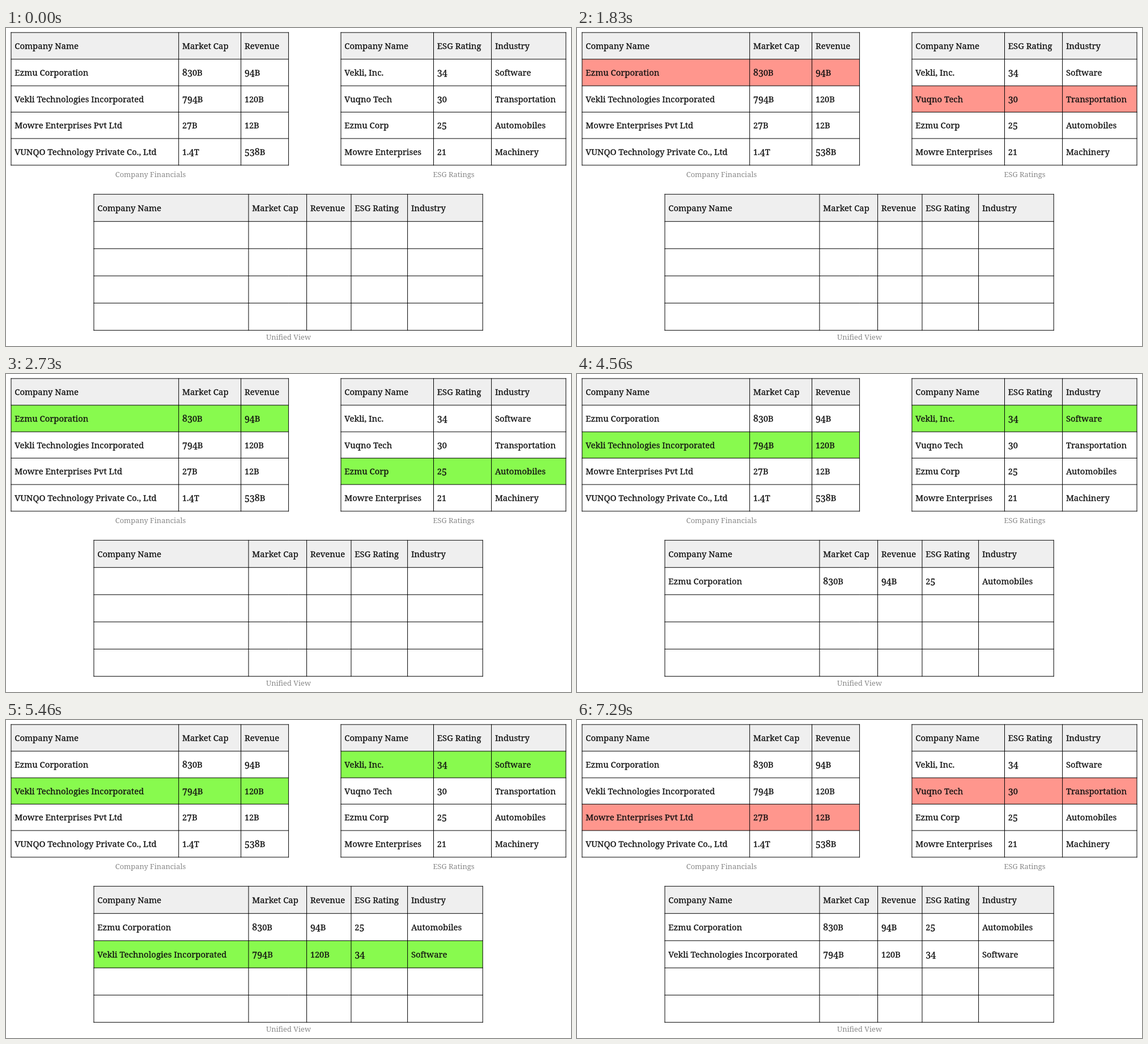
Write an HTML page with a canvas that moves like this. It is 997 px wide and 561 px high and loops after 8 s.

```html
<!DOCTYPE html>
<html lang="en">
<head>
<meta charset="utf-8">
<title>Entity matching</title>
<style>
html, body { margin: 0; width: 100%; height: 100%; overflow: hidden; background: #fff; }
canvas { display: block; }
</style>
</head>
<body>
<canvas id="stage" width="997" height="561"></canvas>
<script>
const ctx = document.getElementById("stage").getContext("2d");
const LOOP = 8000;
const RED = "#ff968d", GREEN = "#88fa4e", HEAD = "#efefef";
const TEXT = 14.9, TALL_FIGURE = 16, SHORT_FIGURE = 14.5, CAPTION = 12.9;
const font = size => `${size}px "Noto Serif", serif`;

const financials = {
  xs: [9, 304.7, 414.6, 498.6],
  ys: [8, 55, 102, 148.4, 195, 242],
  caption: ["Company Financials", 255, 263],
  rows: [
    ["Company Name", "Market Cap", "Revenue"],
    ["Ezmu Corporation", "830B", "94B"],
    ["Vekli Technologies Incorporated", "794B", "120B"],
    ["Mowre Enterprises Pvt Ltd", "27B", "12B"],
    ["VUNQO Technology Private Co., Ltd", "1.4T", "538B"]
  ]
};
const ratings = {
  xs: [591, 754.5, 856.6, 988],
  ys: financials.ys,
  caption: ["ESG Ratings", 790, 263],
  rows: [
    ["Company Name", "ESG Rating", "Industry"],
    ["Vekli, Inc.", "34", "Software"],
    ["Vuqno Tech", "30", "Transportation"],
    ["Ezmu Corp", "25", "Automobiles"],
    ["Mowre Enterprises", "21", "Machinery"]
  ]
};
const unified = {
  xs: [155, 428, 530.6, 609, 708.6, 841.2],
  ys: [0, 1, 2, 3, 4, 5].map(row => 293.3 + 48 * row),
  caption: ["Unified View", 498.5, 550],
  rows: [
    ["Company Name", "Market Cap", "Revenue", "ESG Rating", "Industry"],
    [...financials.rows[1], ...ratings.rows[3].slice(1)],
    [...financials.rows[2], ...ratings.rows[1].slice(1)]
  ]
};

// Compared rows, their colour, merged rows so far, highlighted merged row.
const steps = [
  { at: 0, left: 0, right: 0, color: null, merged: 0, fresh: 0 },
  { at: 930, left: 1, right: 1, color: RED, merged: 0, fresh: 0 },
  { at: 1830, left: 1, right: 2, color: RED, merged: 0, fresh: 0 },
  { at: 2730, left: 1, right: 3, color: GREEN, merged: 0, fresh: 0 },
  { at: 3660, left: 1, right: 3, color: GREEN, merged: 1, fresh: 1 },
  { at: 4560, left: 2, right: 1, color: GREEN, merged: 1, fresh: 0 },
  { at: 5460, left: 2, right: 1, color: GREEN, merged: 2, fresh: 2 },
  { at: 6360, left: 3, right: 1, color: RED, merged: 2, fresh: 0 },
  { at: 7290, left: 3, right: 2, color: RED, merged: 2, fresh: 0 }
];

function ink(text, x, y, size) {
  ctx.font = font(size);
  ctx.fillText(text, x, y);
  ctx.strokeText(text, x, y);
  return ctx.measureText(text).width;
}

// Semi old-style figures: 0-2 are shorter, 3-5, 7 and 9 dip below the baseline.
function drawFigures(text, x, y) {
  for (const ch of text) {
    const drop = "34579".includes(ch) ? 1.5 : 0;
    const size = "012".includes(ch) ? SHORT_FIGURE : /\d/.test(ch) ? TALL_FIGURE : TEXT;
    x += ink(ch, x, y + drop, size);
  }
}

function drawCell(text, x, y) {
  ctx.fillStyle = "#111";
  ctx.strokeStyle = "#111";
  ctx.lineWidth = 0.3;
  if (/^\d/.test(text)) drawFigures(text, x, y);
  else ink(text, x, y, TEXT);
}

function fillRow({ xs, ys }, row, color) {
  const left = xs[0], right = xs[xs.length - 1];
  ctx.fillStyle = color;
  ctx.fillRect(left, ys[row], right - left, ys[row + 1] - ys[row]);
}

function drawGrid({ xs, ys }) {
  const right = xs[xs.length - 1], bottom = ys[ys.length - 1];
  ctx.beginPath();
  for (const x of xs) {
    ctx.moveTo(x, ys[0] - 0.5);
    ctx.lineTo(x, bottom + 0.5);
  }
  for (const y of ys) {
    ctx.moveTo(xs[0] - 0.5, y);
    ctx.lineTo(right + 0.5, y);
  }
  ctx.strokeStyle = "#000";
  ctx.lineWidth = 1;
  ctx.stroke();
}

function drawTable(table, active, color, shown = table.rows.length - 1) {
  const { xs, ys, rows, caption } = table;
  fillRow(table, 0, HEAD);
  if (active) fillRow(table, active, color);
  drawGrid(table);
  ctx.textAlign = "left";
  rows.slice(0, shown + 1).forEach((cells, r) => {
    const baseline = Math.round((ys[r] + ys[r + 1]) / 2 + 5.4);
    cells.forEach((text, c) => drawCell(text, xs[c] + 6.3, baseline));
  });
  ctx.textAlign = "center";
  ctx.fillStyle = "#888";
  ctx.font = font(CAPTION);
  ctx.fillText(...caption);
}

function render(now) {
  const time = now % LOOP;
  const step = steps.filter(s => s.at <= time).pop();
  ctx.fillStyle = "#fff";
  ctx.fillRect(0, 0, 997, 561);
  drawTable(financials, step.left, step.color);
  drawTable(ratings, step.right, step.color);
  drawTable(unified, step.fresh, GREEN, step.merged);
}

function tick(now) {
  render(now);
  requestAnimationFrame(tick);
}

render(0);
requestAnimationFrame(tick);
</script>
</body>
</html>
```
